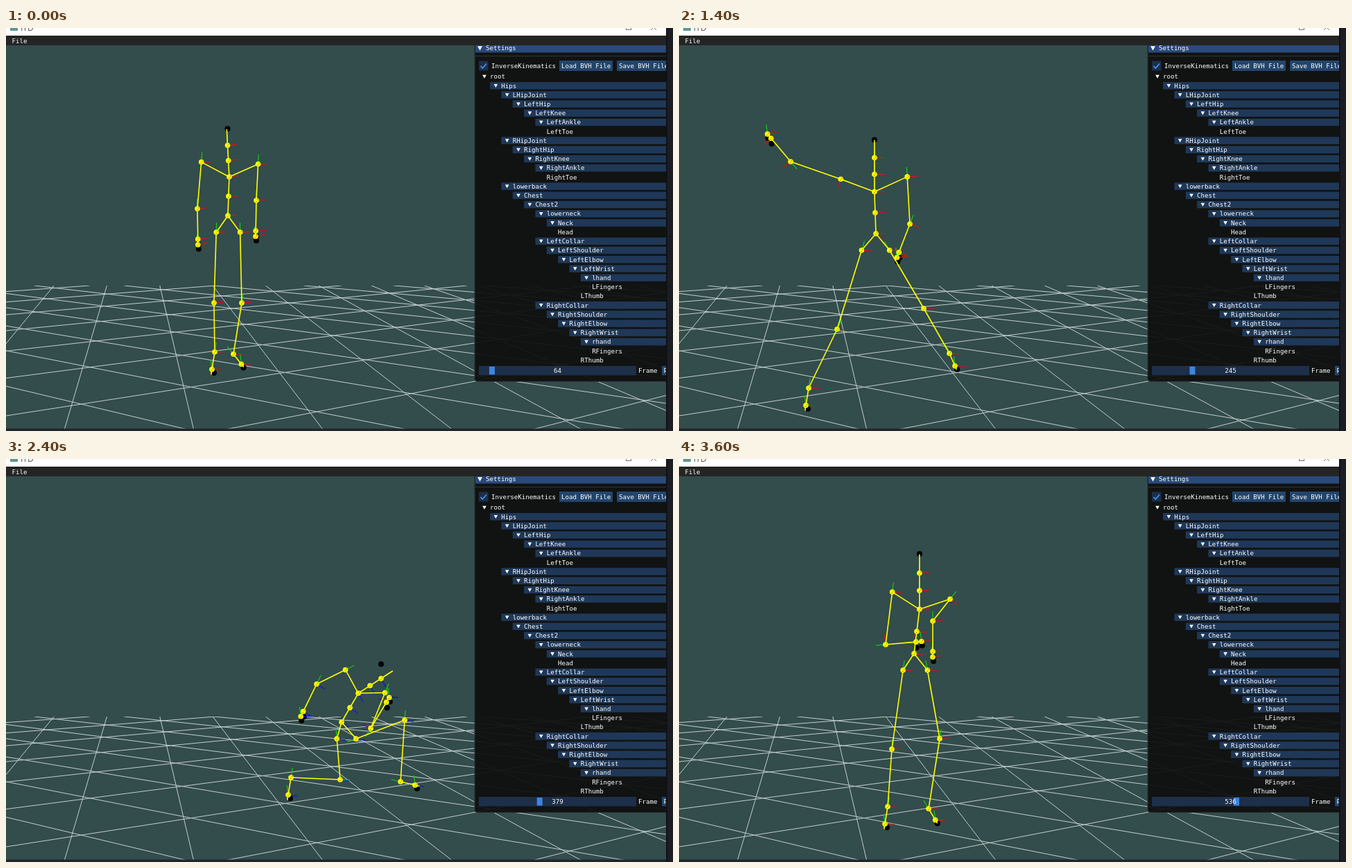
An HTML page with a canvas that plays this animation: 962x582 px, repeating every 3.7 s.

```html
<!DOCTYPE html>
<html lang="en">
<head>
<meta charset="utf-8">
<title>Skeleton viewer</title>
<style>
html, body { margin: 0; width: 100%; height: 100%; overflow: hidden; background: #334c4c; }
canvas { display: block; }
</style>
</head>
<body>
<canvas id="stage" width="962" height="582"></canvas>
<script>
const c = document.getElementById('stage').getContext('2d');
const MONO = '9.1px "DejaVu Sans Mono", monospace';
const STEP = 100, STEPS = 37, RAD = Math.PI / 180;

// Key poses. body: size, shoulder spread, spine lean, neck lean (degrees from upright).
// Arms: elbow x, y and forearm angle. Legs: knee x, y and ankle x, y.
const poses = [
  { at: 0, count: [64], hips: [320, 271], body: [1, 41, 2, -3],
    armL: [276, 261, 89], armR: [361, 249, 91],
    legL: [300, 397, 301, 468], legR: [340, 397, 328, 471] },
  { at: 6, count: [142], hips: [333, 273], body: [1, 37, 6, -8],
    armL: [273, 264, 91], armR: [368, 247, 65],
    legL: [314, 390, 280, 425], legR: [374, 399, 356, 489] },
  { at: 14, count: [245], hips: [284, 297], body: [1.08, 48, -2, 0],
    armL: [161, 193, 230], armR: [333, 283, 111],
    legL: [228, 435, 187, 520], legR: [353, 405, 390, 470] },
  { at: 18, count: [300], hips: [333, 289], body: [1.02, 9, 17, 12],
    armL: [321, 247, 349], armR: [335, 272, 51],
    legL: [292, 420, 204, 496], legR: [398, 399, 359, 480] },
  { at: 24, count: [379], hips: [484, 380], body: [.86, 33, 30, 57],
    armL: [448, 325, 476], armR: [526, 389, -59],
    legL: [482, 463, 411, 460], legR: [575, 377, 569, 466] },
  { at: 32, count: [484], hips: [401, 281], body: [1.03, 36, -3, -12],
    armL: [351, 219, 298], armR: [432, 247, 28],
    legL: [404, 398, 331, 476], legR: [412, 408, 367, 466] },
  { at: 36, count: [536], hips: [339, 281], body: [1.15, 42, 7, 0],
    armL: [298, 268, 355], armR: [366, 234, 90],
    legL: [307, 419, 301, 502], legR: [376, 404, 360, 505] }
];

// Tree rows as "depth name"; a trailing dot marks a leaf.
const tree = ('0 root,1 Hips,2 LHipJoint,3 LeftHip,4 LeftKnee,5 LeftAnkle,5 LeftToe.,' +
  '2 RHipJoint,3 RightHip,4 RightKnee,5 RightAnkle,5 RightToe.,' +
  '2 lowerback,3 Chest,4 Chest2,5 lowerneck,6 Neck,6 Head.,' +
  '5 LeftCollar,6 LeftShoulder,7 LeftElbow,8 LeftWrist,9 lhand,9 LFingers.,8 LThumb.,' +
  '5 RightCollar,6 RightShoulder,7 RightElbow,8 RightWrist,9 rhand,9 RFingers.,8 RThumb.').split(',');

function rect(x, y, w, h, color) {
  c.fillStyle = color;
  c.fillRect(x, y, w, h);
}

function line(x1, y1, x2, y2, color, width = 1) {
  c.strokeStyle = color;
  c.lineWidth = width;
  c.beginPath();
  c.moveTo(x1, y1);
  c.lineTo(x2, y2);
  c.stroke();
}

function text(s, x, y, align = 'left') {
  c.font = MONO;
  c.textAlign = align;
  c.fillStyle = '#fff';
  c.fillText(s, x, y + 3.3);
}

function arrow(x, y, r = 2.8) {
  c.fillStyle = '#fff';
  c.beginPath();
  c.moveTo(x - r, y - r * .8);
  c.lineTo(x + r, y - r * .8);
  c.lineTo(x, y + r);
  c.fill();
}

function ball([x, y], color, r = 4) {
  c.fillStyle = color;
  c.beginPath();
  c.arc(x, y, r, 0, 7);
  c.fill();
}

const add = ([x, y], dx, dy) => [x + dx, y + dy];
const polar = ([x, y], deg, r) => [x + r * Math.cos(deg * RAD), y + r * Math.sin(deg * RAD)];
const between = (p, q, u) => [p[0] + (q[0] - p[0]) * u, p[1] + (q[1] - p[1]) * u];

// Cubic interpolation of every pose value, with tangents from the neighbouring keys.
function poseAt(step) {
  const last = poses.length - 1;
  let i = 0;
  while (i < last - 1 && step >= poses[i + 1].at) i++;
  const p = poses[i], q = poses[i + 1], d = q.at - p.at, u = (step - p.at) / d, v = 1 - u;
  const slope = (k, part, n) => {
    const a = poses[Math.max(k - 1, 0)], b = poses[Math.min(k + 1, last)];
    return (b[part][n] - a[part][n]) / (b.at - a.at);
  };
  const out = {};
  for (const part in p)
    if (part !== 'at') out[part] = p[part].map((from, n) =>
      from * v * v * (1 + 2 * u) + q[part][n] * u * u * (3 - 2 * u) +
      d * u * v * (slope(i, part, n) * v - slope(i + 1, part, n) * u));
  return out;
}

// A triangulated floor: two square-grid directions and the diagonal, each with its vanishing point.
function ground() {
  const horizon = 228, far = 372, near = 580, color = '#c3cecd';
  const family = (vx, first, gap) => {
    for (let n = -12; n < 16; n++) {
      const k = first + gap * n;
      line(vx + k * (far - horizon), far, vx + k * (near - horizon), near, color);
    }
  };
  c.save();
  c.beginPath();
  c.rect(0, far, 952, near - far);
  c.clip();
  family(188, -.295, .53);
  family(2135, -6.43, 1.26);
  family(-1209, 5.08, .9);
  c.restore();
}

function axes([x, y], [cx, cy], yaw, upright) {
  const len = Math.hypot(x - cx, y - cy) || 1;
  const gx = (x - cx) / len, gy = (y - cy) / len;
  const [rx, ry] = upright ? [1, .05] : [-gy, gx];
  const co = Math.cos(yaw), si = Math.sin(yaw);
  line(x, y, x + rx * 15 * co - 3 * si, y + ry * 15 * co - 4 * si, '#e01010', 1.2);
  line(x, y, x + rx * 14 * si, y + ry * 14 * si + 4 * co, '#1010e0', 1.2);
  line(x, y, x + gx * 14, y + gy * 14, '#10d010', 1.2);
}

function joint(p) {
  ball(p, '#ff0', 3.8);
  rect(p[0] - 1, p[1] + 1, 1.5, 1, '#77770a');
  rect(p[0] + 1, p[1] - 2, 1, 1.5, '#77770a');
}

function skeleton(pose) {
  const { hips, body: [size, spread, lean, neck] } = pose;
  const yaw = Math.acos(Math.min(1, spread / 42)) + Math.max(0, lean) * RAD;
  const side = Math.sin(yaw);
  const chest = polar(hips, lean - 90, 56 * size);
  const tip = polar(chest, neck - 90, 69 * size);
  const spine = [tip, between(tip, chest, .34), between(tip, chest, .66), chest,
    between(chest, hips, .5), hips];
  const chains = [{ path: spine, joints: spine.slice(1), isSpine: true }];
  ball(add(spine[1], 0, -24 * size), '#000');

  for (const [name, sign] of [['L', -1], ['R', 1]]) {
    const [ex, ey, turn] = pose['arm' + name];
    const shoulder = polar(polar(chest, lean - 90, 20), lean, sign * spread);
    const elbow = [ex, ey], wrist = polar(elbow, turn, 44), hand = polar(wrist, turn, 8);
    ball(add(wrist, 1, 8), '#000');
    ball(add(hand, 1, 6), '#000');
    const arm = [shoulder, elbow, wrist, hand];
    chains.push({ path: [chest, ...arm], joints: arm });

    const [kx, ky, ax, ay] = pose['leg' + name];
    const [fx, fy] = sign < 0 ? [-4, 25] : [8 + 14 * side, 18 - 14 * side];
    const hip = add(hips, sign * .42 * spread + 14 * Math.sin(lean * RAD), 24);
    const ankle = [ax, ay], toe = add(ankle, fx, fy);
    ball(add(toe, 3, 5), '#000');
    const leg = [hip, [kx, ky], ankle, toe];
    chains.push({ path: [hips, ...leg, add(toe, fx * .3, fy * .3)], joints: leg, isLeg: true });
  }

  for (const { joints, isLeg, isSpine } of chains)
    joints.forEach((p, i) => {
      const child = isSpine ? add(p, p[0] - spine[i][0], p[1] - spine[i][1])
        : joints[i + 1] || add(p, 1, 8);
      axes(p, child, yaw, isLeg);
    });
  for (const { path } of chains)
    for (let i = 1; i < path.length; i++) line(...path[i - 1], ...path[i], '#ff0', 1.6);
  chains.forEach(chain => chain.joints.forEach(joint));
}

function panel(count) {
  const button = '#23456c', field = '#1d2f49';
  c.save();
  c.beginPath();
  c.rect(0, 0, 952, 582);
  c.clip();
  c.fillStyle = 'rgba(15,15,15,.94)';
  c.beginPath();
  c.roundRect(676, 21.5, 300, 489, 4);
  c.fill();
  c.strokeStyle = '#2c3338';
  c.lineWidth = 1;
  c.stroke();
  rect(677, 22, 280, 13.5, '#294a7a');
  arrow(683.5, 29, 3.4);
  text('Settings', 692, 29);
  line(677, 40.5, 952, 40.5, '#34343c');

  rect(682, 47.5, 13.5, 14, field);
  c.strokeStyle = '#4296fa';
  c.lineWidth = 1.7;
  c.beginPath();
  c.moveTo(684.5, 55);
  c.lineTo(687.3, 58);
  c.lineTo(693, 51.5);
  c.stroke();
  text('InverseKinematics', 700, 54.5);
  rect(798, 47, 77, 15, button);
  text('Load BVH File', 801, 54.5);
  rect(881, 47, 77, 15, button);
  text('Save BVH File', 884, 54.5);

  tree.forEach((row, i) => {
    const [depth, name] = row.split(' ');
    const x = 698 + 16.35 * depth, y = 70 + 13.21 * i;
    if (!name.endsWith('.')) {
      if (i) rect(x - 16.3, y - 5.2, 300, 10.5, '#1f3858');
      arrow(x - 8, y);
    }
    text(name.replace('.', ''), x, y);
  });

  rect(682, 488, 227, 13.5, field);
  rect(683 + .2182 * count, 489, 8, 11.5, '#3d85e0');
  text(count, 795.5, 494.8, 'center');
  text('Frame', 912, 494.8);
  rect(946, 488, 10, 13.5, button);
  text('P', 948.5, 494.8);
  c.restore();
}

function chrome() {
  rect(0, 0, 952, 11, '#fff');
  rect(6, 0, 11, 4, '#5f9691');
  c.font = '12px "Open Sans", sans-serif';
  c.textAlign = 'left';
  c.fillStyle = '#555';
  c.fillText('ITD', 21, 3.5);
  c.strokeStyle = '#777';
  c.lineWidth = 1;
  c.strokeRect(894.5, -5.5, 7, 8);
  line(934, -1, 938, 3, '#777');
  line(934, -1, 930, 3, '#777');
  rect(0, 11, 952, 14, '#242424');
  text('File', 8.5, 18.5);
  rect(0, 578.5, 962, 3.5, '#20262b');
  rect(952, 0, 10, 582, '#1c1d24');
  rect(952, 0, 2, 582, '#111216');
}

function draw() {
  const pose = poseAt(Math.floor(performance.now() / STEP) % STEPS);
  rect(0, 0, 962, 582, '#334c4c');
  ground();
  skeleton(pose);
  panel(Math.round(pose.count[0]));
  chrome();
  requestAnimationFrame(draw);
}
draw();
</script>
</body>
</html>
```
